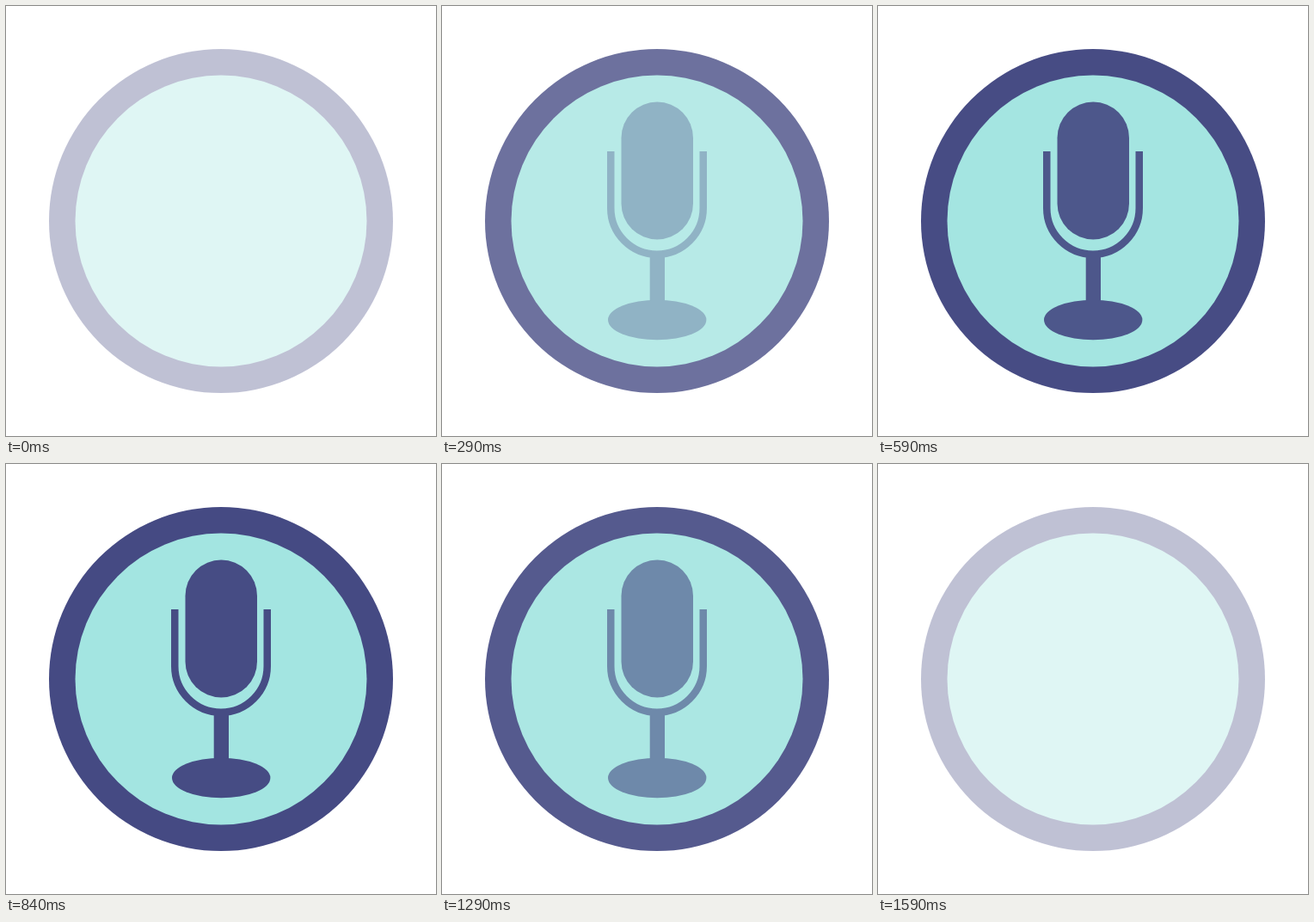
Animation of 500x500 px, one loop 1.79 s. Source, as an HTML page:

```html
<!DOCTYPE html>
<html lang="en">
<head>
<meta charset="utf-8">
<title>Microphone badge</title>
<style>
  html, body { margin: 0; width: 100%; height: 100%; overflow: hidden; background: #fff; }
  svg { display: block; width: 100%; height: 100%; }
</style>
</head>
<body>
<svg viewBox="0 0 500 500">
  <g id="badge">
    <circle cx="250" cy="250" r="200" fill="#454a83"/>
    <circle cx="250" cy="250" r="169.5" fill="#a3e5e1"/>
  </g>
  <g id="mic" fill="#454a83">
    <rect x="208.5" y="111.5" width="83.5" height="160" rx="41.75"/>
    <path d="M196.25 169V235a53.75 53.75 0 0 0 107.5 0V169" fill="none" stroke="#454a83" stroke-width="8.5"/>
    <rect x="241.7" y="288" width="17.3" height="58"/>
    <ellipse cx="250.2" cy="365" rx="57.2" ry="23.2"/>
  </g>
</svg>
<script>
  const LOOP = 1790;
  // Times at which the fade moves on one step; it rises to step 7, then falls.
  const rise = [200, 290, 380, 500, 590, 680, 840];
  const fall = [1080, 1200, 1290, 1410, 1500, 1590];
  const levels = [0.337, 0.594, 0.78, 0.91, 0.965, 0.985, 1, 1];
  const MIC_DELAY = 2;

  const badge = document.getElementById("badge");
  const mic = document.getElementById("mic");

  const passed = (times, t) => times.filter(x => t >= x).length;
  const level = step => step < 0 ? 0 : levels[step];

  function stepAt(t) {
    const down = passed(fall, t);
    return down ? 6 - down : passed(rise, t);
  }

  function draw(now) {
    const step = stepAt(now % LOOP);
    badge.setAttribute("opacity", level(step));
    mic.setAttribute("opacity", level(step - MIC_DELAY));
  }

  let start;
  function tick(now) {
    start ??= now;
    draw(now - start);
    requestAnimationFrame(tick);
  }
  draw(0);
  requestAnimationFrame(tick);
</script>
</body>
</html>
```
